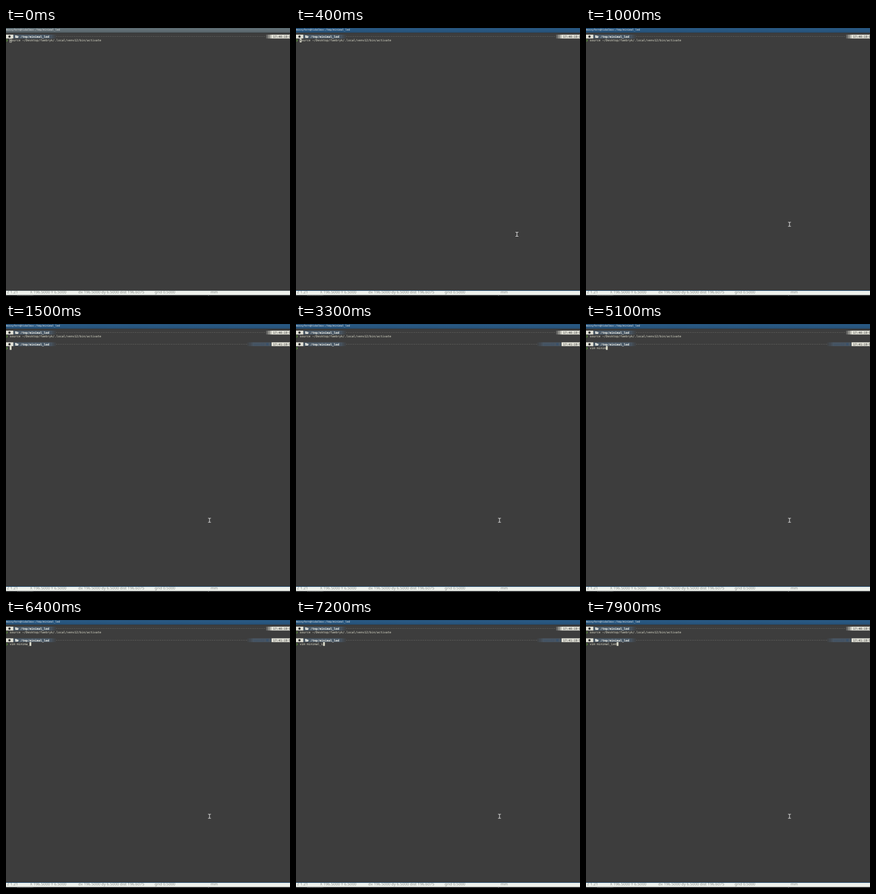
An HTML page for the animation above (8 s loop, 554 px wide and 523 px high).

```html
<!DOCTYPE html>
<html lang="en">
<head>
<meta charset="utf-8">
<title>Terminal session</title>
<style>
  html, body { margin: 0; width: 554px; height: 523px; overflow: hidden; background: #3d3d3d; }
  svg { display: block; }
  text { text-rendering: geometricPrecision; white-space: pre; }
  .mono { font: 5.82px "DejaVu Sans Mono", monospace; fill: #e2e2d0; }
  .title { font-size: 5px; fill: #f2f2f2; }
  .bold { font-weight: bold; fill: #f0f0e8; }
  .dark { fill: #303030; }
  .prompt { fill: #6cc832; }
  .venv { fill: #3a5068; }
  .dots { stroke: #84847e; stroke-dasharray: 1 2.5; }
  .status { font: 7.6px "Noto Sans", sans-serif; fill: #8c908c; }
</style>
</head>
<body>
<svg width="554" height="523" viewBox="0 0 554 523">
  <defs>
    <linearGradient id="idle" x2="0" y2="1">
      <stop stop-color="#56656b"/><stop offset=".3" stop-color="#65737a"/><stop offset="1" stop-color="#556166"/>
    </linearGradient>
    <linearGradient id="active" x2="0" y2="1">
      <stop stop-color="#244f75"/><stop offset=".3" stop-color="#295a85"/><stop offset="1" stop-color="#264f74"/>
    </linearGradient>
    <clipPath id="strip"><rect y="513" width="554" height="8"/></clipPath>
    <g id="fade">
      <rect width="3.5" height="7.5" opacity=".25"/>
      <rect x="3.5" width="3.5" height="7.5" opacity=".5"/>
      <rect x="7" width="3.5" height="7.5" opacity=".75"/>
    </g>
    <g id="bar">
      <rect width="14.5" height="7.5" fill="#e0e0d6"/>
      <circle cx="6.8" cy="3.8" r="2.2" fill="#2c2c2c"/>
      <rect x="14.5" width="72" height="7.5" fill="#4b5a68"/>
      <use href="#fade" transform="translate(97) scale(-1 1)" fill="#4b5a68"/>
      <path d="M18 6.2V1.4h2.2l.7.8h2.6v1h1.3L23.4 6.2z" fill="#f0f0e8"/>
      <path d="M18.6 5.3l1-1.6h4" fill="none" stroke="#4b5a68" stroke-width=".5"/>
      <text class="mono bold" x="28.3" y="5.9">/tmp/minimal_led</text>
      <rect x="518" width="36" height="7.5" fill="#e0e0d6"/>
      <circle cx="554.5" cy="3.8" r="2.3" fill="none" stroke="#303030" stroke-width=".8"/>
    </g>
    <path id="beam" d="M-3-4H-1Q0-4 0-3Q0-4 1-4H3M0-3V3M-3 4H-1Q0 4 0 3Q0 4 1 4H3"/>
  </defs>

  <rect width="554" height="523" fill="#3d3d3d"/>
  <rect id="titlebar" width="554" height="9"/>
  <rect y="9" width="554" height="1" fill="#34383a"/>
  <text class="mono title" x="0" y="5.4">mossyfern@tidalbox:/tmp/minimal_led</text>

  <use href="#bar" y="13"/>
  <path class="dots" d="M98 16.5H507"/>
  <use href="#fade" x="507.5" y="13" fill="#e0e0d6"/>
  <text class="mono dark" x="521" y="19">17:40:19</text>
  <text class="mono prompt" x=".3" y="26.4">❯</text>
  <text class="mono" x="7.3" y="26.4">source ~/Desktop/faebryk/.local/venv12/bin/activate</text>

  <g id="second">
    <use href="#bar" y="35.7"/>
    <path class="dots" d="M98 39.5H470"/>
    <use href="#fade" x="470.5" y="35.7" fill="#485562"/>
    <rect x="481" y="35.7" width="36" height="7.5" fill="#485562"/>
    <text class="mono venv" x="483" y="41.6">venv12</text>
    <rect class="venv" x="507.5" y="37.3" width="4.5" height="4.5"/>
    <text class="mono dark" x="521" y="41.6">17:41:19</text>
    <text class="mono prompt" x=".3" y="49">❯</text>
    <text id="typed" class="mono" x="7.3" y="49"></text>
  </g>

  <rect id="caret" width="3.5" height="7.4" stroke="#dcdccc" stroke-width=".7"/>
  <text id="under" class="mono dark" x="7.3" y="26.4">s</text>

  <rect y="513" width="554" height="8" fill="#eef1ec"/>
  <g class="status" clip-path="url(#strip)">
    <text x="2" y="517.8">Z 1.21</text>
    <text x="47" y="517.8">X 196.5000 Y 6.5000</text>
    <text x="141" y="517.8">dx 196.5000 dy 6.5000 dist 196.6075</text>
    <text x="290" y="517.8">grid 0.5000</text>
    <text x="399" y="517.8">mm</text>
  </g>
  <rect y="521" width="554" height="2" fill="#2b2d2f"/>
  <path d="M22 522.5h31M394 522.5h2" stroke="#686c6c" stroke-dasharray="2 1"/>
  <rect id="border" y="512" width="554" height="1"/>

  <g id="mouse" fill="none">
    <use href="#beam" stroke="#202020" stroke-width="2.2" opacity=".6"/>
    <use href="#beam" stroke="#e8e8e8" stroke-width="1.2"/>
  </g>
</svg>
<script>
const LOOP = 8000, CELL = 3.503, LEFT = 7.3;
const el = id => document.getElementById(id);
const set = (id, attrs) => {
  for (const key in attrs) el(id).setAttribute(key, attrs[key]);
};
const show = (id, on) => set(id, { visibility: on ? "visible" : "hidden" });

// Each entry holds from its time until the next one.
const typing = [
  [0, ""], [3700, "v"], [3800, "vi"], [4000, "vim"], [4100, "vim "],
  [4500, "vim m"], [4600, "vim mi"], [4800, "vim min"], [4900, "vim mini"],
  [5100, "vim minim"], [5300, "vim minima"], [5400, "vim minimal"],
  [5800, "vim minimal_"], [6200, "vim minimal"], [6300, "vim minima"],
  [6400, "vim minima_"], [6700, "vim minima"], [6800, "vim minimal"],
  [7100, "vim minimal_"], [7200, "vim minimal_L"], [7400, "vim minimal_Led"],
  [7500, "vim minimal_Led."], [7900, "vim minimal_Led"]
];

function draw(t) {
  const focused = t >= 400, entered = t >= 1500;
  const text = typing.findLast(([start]) => t >= start)[1];
  const blinkOff = (t >= 1000 && t < 1500) || (t >= 2100 && t < 2700) || (t >= 3300 && t < 3700);

  set("titlebar", { fill: focused ? "url(#active)" : "url(#idle)" });
  set("border", { fill: focused ? "#295a85" : "#59666b" });
  show("second", entered);
  el("typed").textContent = text;

  set("caret", {
    x: LEFT + text.length * CELL,
    y: entered ? 43.1 : 20.6,
    fill: focused ? "#dcdccc" : "none",
    "stroke-opacity": focused ? 0 : 1
  });
  show("caret", !blinkOff);
  show("under", focused && t < 1000);

  const step = Math.min(3, Math.max(0, Math.floor((t - 400) / 100))) / 3;
  set("mouse", { transform: `translate(${431 - 34 * step} ${402.5 - 19.5 * step})` });
  show("mouse", focused);
}

function tick() {
  draw(performance.now() % LOOP);
  requestAnimationFrame(tick);
}
tick();
</script>
</body>
</html>
```
